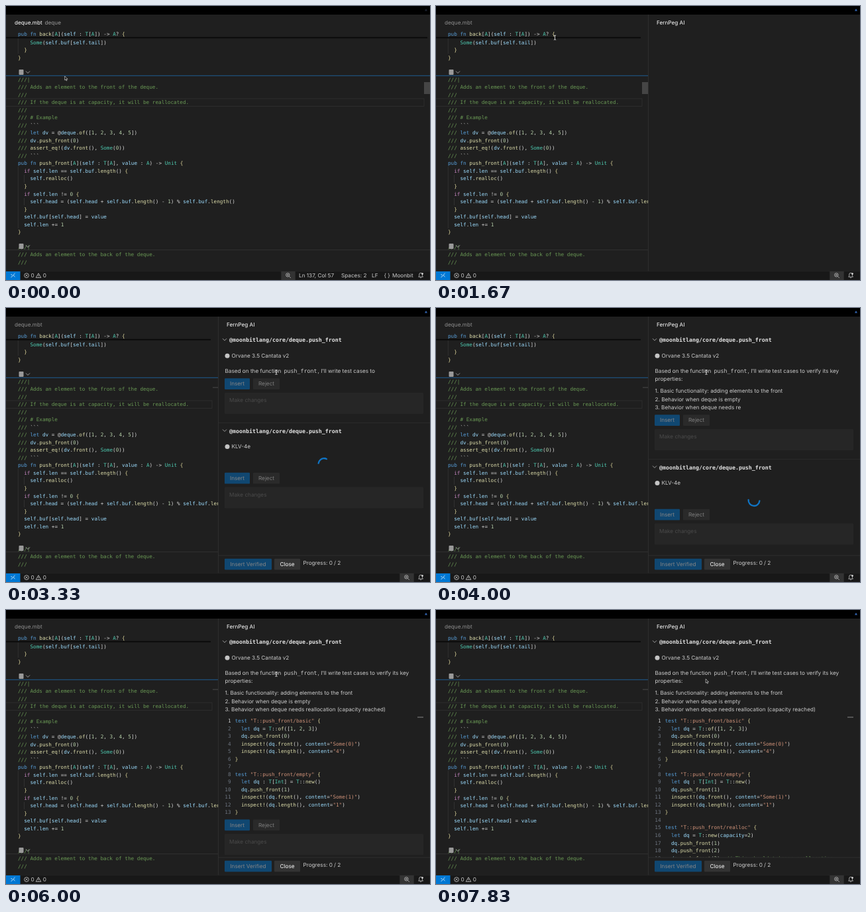
An HTML page for the animation above (8000 ms loop, 640 by 414 pixels).

```html
<!DOCTYPE html>
<html lang="en">
<head>
<meta charset="utf-8">
<title>Editor with assistant panel</title>
<style>
html, body { margin: 0; width: 100%; height: 100%; overflow: hidden; background: #1f1f1f; }
svg { display: block; width: 100vw; height: 100vh; }
text { white-space: pre; text-rendering: geometricPrecision; fill: #ccc; }
.ui { font-family: Inter, Roboto, sans-serif; font-size: 8.2px; }
.code { font-family: "DejaVu Sans Mono", "Liberation Mono", monospace; font-size: 7.66px; }
.mono { font-family: "DejaVu Sans Mono", "Liberation Mono", monospace; font-size: 8.3px; }
</style>
</head>
<body>
<svg id="stage" viewBox="0 0 640 414" preserveAspectRatio="none"></svg>
<script>
const LOOP = 8000, STEP = 1000 / 6, ROW = 11.52;
const SPLIT_AT = 1170, RESULTS_AT = 2160;

const editorCode = `  if self.len == 0 {
    Some(self.buf[self.tail])
  }
}

///|
/// Adds an element to the front of the deque.
///
/// If the deque is at capacity, it will be reallocated.
///
/// # Example
/// \`\`\`
/// let dv = @deque.of([1, 2, 3, 4, 5])
/// dv.push_front(0)
/// assert_eq!(dv.front(), Some(0))
/// \`\`\`
pub fn push_front[A](self : T[A], value : A) -> Unit {
  if self.len == self.buf.length() {
    self.realloc()
  }
  if self.len != 0 {
    self.head = (self.head + self.buf.length() - 1) % self.buf.length()
  }
  self.buf[self.head] = value
  self.len += 1
}

///|
/// Adds an element to the back of the deque.
///`.split("\n").slice(1);

const prose = [
  ["Based on the function ", "push_front", ", I'll write test cases to verify its key"],
  ["properties:"],
  ["1. Basic functionality: adding elements to the front"],
  ["2. Behavior when deque is empty"],
  ["3. Behavior when deque needs reallocation (capacity reached)"],
];
const proseY = [95.5, 107.5, 125.5, 138, 150.5];
const proseX = [330.5, 419.5, 470.5];

const answerCode = `test "T::push_front/basic" {
  let dq = T::of([1, 2, 3])
  dq.push_front(0)
  inspect!(dq.front(), content="Some(0)")
  inspect!(dq.length(), content="4")
}

test "T::push_front/empty" {
  let dq : T[Int] = T::new()
  dq.push_front(1)
  inspect!(dq.front(), content="Some(1)")
  inspect!(dq.length(), content="1")
}

test "T::push_front/realloc" {
  let dq = T::new(capacity=2)
  dq.push_front(1)
  dq.push_front(2)
  dq.push_front(3)  // This should trigger reallocation
  inspect!(dq.front(), content="Some(3)")
  inspect!(dq.length(), content="3")
}`.split("\n");

const rows = [...prose.map(parts => parts.join("")), ...answerCode];
const charsBefore = row => rows.slice(0, row).reduce((sum, s) => sum + s.length + 1, 0);

// [time, typed characters]
const typing = [
  [2830, 0],
  [4000, charsBefore(4) + 31],
  [4833, charsBefore(8) + 9],
  [6000, charsBefore(17) + 1],
  [7833, charsBefore(rows.length)],
];
// [time, spinner turn]
const spinning = [[2167, -0.06], [2667, 0.19], [4000, 0.5], [4833, 1.275], [8000, 2.86]];
// [time, x, y] of the pointer
const pointerX = [[0, 88.7], [600, 88.7], [1667, 178.5], [2500, 408], [7400, 408], [7833, 406.7]];
const pointerY = [[0, 106], [600, 106], [1667, 47.5], [2500, 97], [7400, 97], [7833, 108.5]];

function at(keys, t) {
  if (t <= keys[0][0]) return keys[0][1];
  for (let i = 1; i < keys.length; i++) {
    const [t0, v0] = keys[i - 1], [t1, v1] = keys[i];
    if (t <= t1) return v0 + (v1 - v0) * (t - t0) / (t1 - t0);
  }
  return keys[keys.length - 1][1];
}

const escape = s => s.replace(/&/g, "&amp;").replace(/</g, "&lt;");
const rect = (x, y, w, h, fill, extra = "") =>
  `<rect x="${x}" y="${y}" width="${w}" height="${h}" fill="${fill}" ${extra}/>`;
const label = (x, y, s, fill = "#ccc", cls = "ui", extra = "") =>
  `<text class="${cls}" x="${x}" y="${y + 2.9}" style="fill:${fill}" ${extra}>${escape(s)}</text>`;
const stroke = (d, color, width = 0.8) =>
  `<path d="${d}" fill="none" stroke="${color}" stroke-width="${width}"/>`;
const dot = (x, y, r, fill) => `<circle cx="${x}" cy="${y}" r="${r}" fill="${fill}"/>`;
const chevron = (x, y) => stroke(`M${x - 3} ${y - 1.5}l3 3l3 -3`, "#bbb", 0.8);

const tokenPattern = new RegExp([
  /(?<comment>\/\/\/(?= (?:let dv|dv\.|assert|`))|\/\/.*)/,
  /(?<string>"[^"]*"?)/,
  /(?<keyword>\b(?:pub|fn|let|test)\b)/,
  /(?<control>\bif\b)/,
  /(?<type>\b[A-Z]\w*)/,
  /(?<call>(?<=fn )\w+|\b[a-z_]\w*!?(?=\())/,
  /(?<number>\b\d+)/,
  /(?<name>\b[a-z_]\w*)/,
  /(?<brace>[{}])/,
  /(?<plain>\s+|.)/,
].map(r => r.source).join("|"), "g");
const colors = {
  comment: "#6a9955", string: "#ce9178", keyword: "#569cd6", control: "#c586c0",
  type: "#4ec9b0", call: "#dcdcaa", number: "#b5cea8", name: "#9cdcfe",
  brace: "#dcd49a", plain: "#d4d4d4",
};

function codeLine(x, y, source) {
  let spans = "";
  for (const { 0: token, groups } of source.matchAll(tokenPattern)) {
    const kind = Object.keys(colors).find(k => groups[k] !== undefined);
    spans += `<tspan fill="${colors[kind]}">${escape(token)}</tspan>`;
  }
  return `<text class="code" x="${x}" y="${y + 2.7}">${spans}</text>`;
}

function codeLens(y) {
  return rect(19.5, y - 4, 7, 8, "#999", 'rx="1"') + chevron(33, y);
}

function editor(t) {
  const split = t >= SPLIT_AT, width = split ? 320 : 640;
  const guide = (x, y0, y1) => stroke(`M${x} ${y0}V${y1}`, "#3d3d3d", 0.6);
  let out = label(13, 25, "deque.mbt", split ? "#8c8c8c" : "#fff");
  if (!split) out += label(58.5, 25.2, "deque", "#999", "ui", 'font-size="7.4" style="font-size:7.4px"');
  out += rect(-1, 140, width - 8, 11.5, "none", 'stroke="#303030" stroke-width="0.8"');
  out += guide(18.3, 49, 72) + guide(18.3, 243, 336) + guide(27.5, 255, 267) + guide(27.5, 290, 301);
  editorCode.forEach((line, i) => {
    // two lens rows are slightly taller than a text row
    const y = 55 + i * ROW + (i > 3 ? -1.6 : 0) + (i > 24 ? -0.3 : 0);
    out += codeLine(18, y + (i > 3 ? 11.52 : 0) - (i > 24 ? 0 : 0), line);
  });
  out += codeLens(100) + codeLens(363);
  out += rect(0, 104.8, width, 0.9, "#1f639f") + rect(0, 368.1, width, 0.7, "#373737");
  out += rect(0, 36, width - 10, 11, "#1f1f1f") + rect(0, 46.8, width - (split ? 11 : 4), 2, "#0b0b0b");
  out += codeLine(18, 42, "pub fn back[A](self : T[A]) -> A? {");
  if (t < RESULTS_AT) out += rect(width - 9, 115, 9, 18, "#454545");
  else out += rect(312, 119.6, 8, 1, "#4a4a4a");
  return out;
}

function spinner(y, turn) {
  const p = turn - Math.floor(turn), r = 8.4, round = 2 * Math.PI * r;
  const length = round * Math.max(0.001, p < 0.5 ? p : 1 - p);
  const angle = (p < 0.5 ? 900 * p : 450 + 1260 * (p - 0.5)) - 90;
  return `<circle cx="480" cy="${y}" r="${r}" fill="none" stroke="#0f74c4" stroke-width="2.3"
    stroke-linecap="round" stroke-dasharray="${length} ${round}" transform="rotate(${angle} 480 ${y})"/>`;
}

const button = (x, y, w, text, fill, opacity = 1) =>
  `<g opacity="${opacity}">${rect(x, y - 8.3, w, 16.8, fill, 'rx="1.2"')}` +
  label(x + w / 2, y, text, "#fff", "ui", 'text-anchor="middle"') + "</g>";

function controls(y) {
  return button(330, y, 38, "Insert", "#0078d4", 0.45) +
    button(373, y, 40, "Reject", "#3a3a3a", 0.42) +
    `<g opacity="0.4">${rect(330, y + 13.5, 300, 32, "#313131", 'rx="1.2"')}` +
    label(337, y + 25, "Make changes", "#8a8a8a") + "</g>";
}

function sectionHead(y, model) {
  return chevron(330, y - 0.8) +
    label(337, y, "@moonbitlang/core/deque.push_front", "#e4e4e4", "mono", 'font-weight="bold"') +
    dot(334, y + 23.7, 3.5, "#c4c4c4") + label(340.5, y + 23.7, model);
}

function answer(typed) {
  let out = "", left = typed, bottom = 0;
  rows.forEach((row, i) => {
    if (left <= 0) return;
    const shown = Math.min(left, row.length);
    if (i < prose.length) {
      bottom = proseY[i];
      let rest = shown;
      prose[i].forEach((part, k) => {
        if (rest > 0) out += label(proseX[k], bottom, part.slice(0, rest), "#ccc", k === 1 ? "mono" : "ui");
        rest -= part.length;
      });
    } else {
      const n = i - prose.length;
      bottom = 167.5 + n * ROW;
      if (!n) out += rect(621, 161.5, 9, 1, "#8a8a8a");
      out += label(339.5, bottom - 0.2, `${n + 1}`, n ? "#6e7681" : "#ccc", "code", 'text-anchor="end"');
      out += codeLine(345.7, bottom, row.slice(0, shown));
    }
    left -= row.length + 1;
  });
  return { out, bottom };
}

function results(t) {
  const typed = Math.floor(at(typing, t)), turn = at(spinning, t);
  const { out, bottom } = answer(typed);
  const controlsY = typed ? bottom + 19 : 119.7;
  const nextY = controlsY + 71.3;
  return `<g clip-path="url(#scroll)">` +
    sectionHead(48.5, "Orvane 3.5 Cantata v2") +
    (typed ? out : spinner(98.3, turn)) + controls(controlsY) +
    rect(320, nextY - 12.8, 320, 0.7, "#303030") +
    sectionHead(nextY, "KLV-4e") + spinner(nextY + 49.8, turn) + controls(nextY + 71.3) + "</g>" +
    rect(320, 373.6, 320, 0.7, "#333") +
    button(330, 387, 71, "Insert Verified", "#0078d4", 0.45) +
    button(405, 387, 39, "Close", "#333") +
    label(448.5, 385, "Progress: 0 / 2");
}

function panel(t) {
  return rect(320, 13, 320, 388, "#1f1f1f") + rect(320, 13, 0.8, 388, "#333") +
    label(333, 25, "FernPeg AI", "#fff") + (t >= RESULTS_AT ? results(t) : "");
}

function statusBar(split) {
  const y = 407.2, zoom = split ? 605 : 426;
  let out = rect(0, 400.5, 640, 13.5, "#181818") + rect(0, 400.5, 640, 0.6, "#2b2b2b");
  out += rect(0, 401, 21.5, 13, "#0078d4") + stroke("M7.5 405l2.6 2.6l-2.6 2.6M13.5 404l-2.6 2.6l2.6 2.6", "#fff", 0.8);
  out += `<circle cx="31" cy="${y}" r="3.4" fill="none" stroke="#ccc" stroke-width=".8"/>` +
    stroke("M29.6 405.8l2.8 2.8m0 -2.8l-2.8 2.8", "#ccc") + label(37.5, y, "0");
  out += stroke("M49 403.8l3.8 6.6h-7.6zM49 406v2.2m0 .7v.7", "#ccc") + label(55.7, y, "0");
  out += rect(zoom - 10.7, 401, 21.4, 13, "#333") +
    `<circle cx="${zoom - 0.7}" cy="406.4" r="2.7" fill="none" stroke="#ccc" stroke-width=".8"/>` +
    stroke(`M${zoom + 1.3} 408.4l2.6 2.6M${zoom - 2} 406.4h2.6m-1.3 -1.3v2.6`, "#ccc", 0.7);
  if (!split) {
    [[442, "Ln 137, Col 57"], [506, "Spaces: 2"], [552, "LF"], [570.5, "{ }"], [583, "Moonbit"]]
      .forEach(([x, s]) => out += label(x, y, s));
  }
  return out + stroke("M622.8 409.3h6.6l-.9 -1.6v-2a2.4 2.4 0 0 0 -4.8 0v2zM625.3 410.7h1.6", "#ccc") +
    dot(628.5, 404.6, 1.4, "#ddd");
}

function pointer(t) {
  const x = at(pointerX, t), y = at(pointerY, t);
  const overText = (t > 1300 && t < 2200) || (t > 2900 && t < 7400);
  const shape = overText
    ? stroke("M-1.6 -3.5q1.6 0 1.6 1q0 -1 1.6 -1M0 -2.8v5.6M-1.6 3.5q1.6 0 1.6 -1q0 1 1.6 1", "#eee", 0.8)
    : `<path d="M0 0v6l1.4 -1.2l1 2.2l1 -.5l-1 -2.1h1.9z" fill="#111" stroke="#eee" stroke-width=".6"/>`;
  return `<g transform="translate(${x} ${y})">${shape}</g>`;
}

function scene(t) {
  const split = t >= SPLIT_AT;
  return `<defs><clipPath id="scroll"><rect x="320" y="36" width="320" height="337.5"/></clipPath></defs>` +
    rect(0, 0, 640, 414, "#1f1f1f") + editor(t) + (split ? panel(t) : "") +
    rect(0, 0, 640, 13, "#000") +
    `<path d="M634 4l2 3.4h-4z" fill="${split ? "#3467b5" : "#1c2230"}"/>` +
    statusBar(split) + pointer(t);
}

const stage = document.getElementById("stage");
let shownStep = -1;
function tick() {
  const step = Math.floor((performance.now() % LOOP) / STEP);
  if (step !== shownStep) {
    shownStep = step;
    stage.innerHTML = scene(step * STEP + 4);
  }
  requestAnimationFrame(tick);
}
tick();
</script>
</body>
</html>
```
